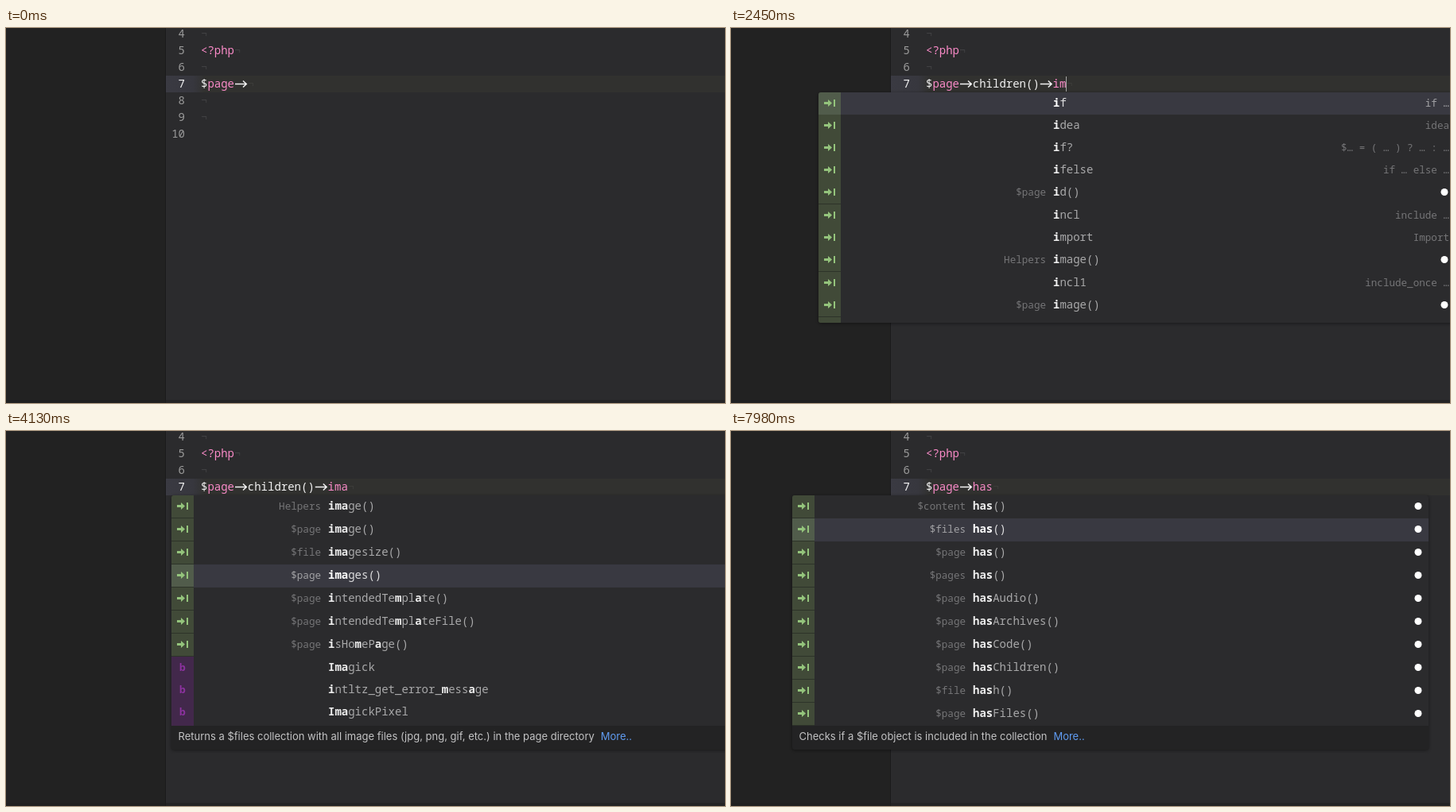
An HTML page with a canvas for the animation above (8 s loop, 904x472 px).

```html
<!DOCTYPE html>
<html lang="en">
<head>
<meta charset="utf-8">
<title>Editor autocomplete</title>
<style>
html, body { margin: 0; width: 100%; height: 100%; overflow: hidden; background: #2b2b2d; }
canvas { display: block; }
</style>
</head>
<body>
<canvas id="stage" width="904" height="472"></canvas>
<script>
const ctx = document.getElementById('stage').getContext('2d');
const LOOP = 8000, CHAR = 8.4, CODE_X = 245, LINE = 21, MENU_TOP = 81, MENU_HEIGHT = 290;
const MONO = '"Noto Sans Mono", monospace';
const PINK = '#fa8bc8', WHITE = '#f2f2f2';
const BG = '#2b2b2d';

// Typed text after "$page->" : [time, text]
const keys = [
  [-600, ''], [140, 'c'], [280, 'ch'], [420, 'chi'], [560, 'chil'], [1050, 'children()'],
  [1820, 'children()-'], [1890, 'children()->'], [2240, 'children()->i'],
  [2380, 'children()->im'], [2590, 'children()->ima'], [4620, 'children()->images()']
];
const finalText = 'children()->images()';
for (let i = 1; i <= finalText.length; i++) keys.push([6060 + i * 30, finalText.slice(0, -i)]);
keys.push([6860, 'h'], [7000, 'ha'], [7140, 'has']);

// Rows are "kind|label|name|hint": k = documented method, s = snippet, b = built-in
const rows = text => text.trim().split('\n').map(line => {
  const [kind, label, name, hint] = line.trim().split('|');
  return { kind, label, name, hint, height: kind === 'k' ? 29 : 28 };
});

const menus = {
  c: { left: 74, right: 766, x: 304, match: 'c', rows: rows(`
    s||class|class …
    s||case|case …
    s||catch|catch …
    k|$page|code()|
    k|$pages|code()|
    s||const|const …
    k|$page|content()|
    k|$page|children()|
    k|$site|children()|
    k|$pages|count()|`) },
  chil: { left: 107, right: 627, x: 304, match: 'chil', rows: rows(`
    k|$page|children()|
    k|$pages|children()|
    k|$site|children()|`) },
  i: { left: 110, right: 910, x: 405, match: 'i', rows: rows(`
    s||if|if …
    s||idea|idea
    s||if?|$… = ( … ) ? … : …
    s||ifelse|if … else …
    k|$page|id()|
    s||incl|include …
    s||import|Import
    k|Helpers|image()|
    s||incl1|include_once …
    k|$page|image()|
    k|$file|imagesize()|`) },
  im: { left: 125, right: 925, x: 405, match: 'im', rows: rows(`
    s||import|Import
    k|Helpers|image()|
    k|$page|image()|
    k|$file|imagesize()|
    k|$page|images()|
    k|$page|intendedTemplate()|
    k|$page|intendedTemplateFile()|
    k|$page|isHomePage()|
    b||Imagick|
    b||ImagickPixel|`) },
  ima: { left: 208, right: 1008, x: 405, match: 'ima', rows: rows(`
    k|Helpers|image()|
    k|$page|image()|
    k|$file|imagesize()|
    k|$page|images()|
    k|$page|intendedTemplate()|
    k|$page|intendedTemplateFile()|
    k|$page|isHomePage()|
    b||Imagick|
    b||intltz_get_error_message|
    b||ImagickPixel|`) },
  has: { left: 77, right: 877, x: 304, match: 'has', rows: rows(`
    k|$content|has()|
    k|$files|has()|
    k|$page|has()|
    k|$pages|has()|
    k|$page|hasAudio()|
    k|$page|hasArchives()|
    k|$page|hasCode()|
    k|$page|hasChildren()|
    k|$file|hash()|
    k|$page|hasFiles()|`) }
};

// [time, menu, selected row, documentation]
const menuSteps = [
  [0], [210, 'c', 0], [700, 'chil', 0, 'Returns a collection with all children of the page'],
  [1050], [2310, 'i', 0], [2590, 'im', 0],
  [2660, 'ima', 0, 'Returns the first image of the page or the image with the given filename'],
  [3220, 'ima', 1, 'Returns a specific image $file object by filename. If no filename is given, the first available image will be returned'],
  [3640, 'ima', 2, 'Returns the dimensions of the image file'],
  [3920, 'ima', 3, 'Returns a $files collection with all image files (jpg, png, gif, etc.) in the page directory'],
  [4620], [7210, 'has', 0, 'Checks if a field exists in the content'],
  [7700, 'has', 1, 'Checks if a $file object is included in the collection']
];

const latest = (list, t) => list.findLast(step => step[0] <= t);

function rect(x, y, w, h, color) {
  ctx.fillStyle = color;
  ctx.fillRect(x, y, w, h);
}

function text(str, x, y, color, { size = 14, weight = 400, family = MONO, align = 'left' } = {}) {
  ctx.font = `${weight} ${size}px ${family}`;
  ctx.textAlign = align;
  ctx.fillStyle = color;
  ctx.fillText(str, x, y);
}

function codeArrow(x, y) {
  ctx.strokeStyle = WHITE;
  ctx.lineWidth = 1.5;
  ctx.beginPath();
  ctx.moveTo(x + 1, y);
  ctx.lineTo(x + 15, y);
  ctx.moveTo(x + 11, y - 4);
  ctx.lineTo(x + 15.3, y);
  ctx.lineTo(x + 11, y + 4);
  ctx.stroke();
}

function drawEditor(menuOpen) {
  rect(0, 0, 904, 472, BG);
  rect(0, 0, 200, 472, '#222222');
  rect(200, 0, 1, 472, '#1a1a1b');
  rect(0, 468, 904, 4, 'rgba(30,30,30,.5)');

  const glow = ctx.createLinearGradient(201, 0, 250, 0);
  glow.addColorStop(0, '#3a3a42');
  glow.addColorStop(0.7, '#37373e');
  glow.addColorStop(1, '#31312f');
  rect(201, 60, 703, LINE, glow);

  for (let n = 4; n <= 10; n++) {
    const y = 12 + (n - 4) * LINE;
    text(n, 225, y, n === 7 ? WHITE : '#9b9b9b', { weight: 500, align: 'right' });
    if (n !== 5 && n !== 7 && n !== 10) text('¬', CODE_X, y, '#424244');
  }
  text('<?php', CODE_X, 33, PINK, { weight: 500 });
  text('¬', CODE_X + 5 * CHAR, 33, '#424244');
}

function drawCode(t) {
  const [since, typed] = latest(keys, t);
  const y = 75, weight = 500;
  let x = CODE_X;
  for (const [token] of ('$page->' + typed).matchAll(/->|\w+|\W/g)) {
    if (token === '->') codeArrow(x, 70.5);
    else {
      const end = Math.round((x - CODE_X) / CHAR) + token.length;
      const called = ('$page->' + typed)[end] === '(';
      text(token, x, y, /\w/.test(token) && !called ? PINK : WHITE, { weight });
    }
    x += token.length * CHAR;
  }
  text('¬', x, y, '#3d3d3b');
  if (typed.endsWith('()')) {
    for (let dot = x - 2 * CHAR; dot < x; dot += 2) rect(Math.round(dot), 80, 1, 1, '#66d9ef');
  }
  if ((t - since) % 1000 < 500) rect(Math.round(x), 61, 1, 19, '#a5a5a5');
}

function drawIcon(kind, left, mid) {
  if (kind === 'b') {
    text('b', left + 14, mid + 5, '#8d32a0', { size: 13, weight: 700, align: 'center' });
    return;
  }
  rect(left + 7, mid - 1, 6, 3, '#94c47c');
  rect(left + 19, mid - 4, 2, 9, '#94c47c');
  ctx.beginPath();
  ctx.moveTo(left + 12, mid - 4);
  ctx.lineTo(left + 17, mid + 0.5);
  ctx.lineTo(left + 12, mid + 5);
  ctx.fill();
}

// Characters matching the typed letters in order are emphasised.
function drawName(name, match, x, y, selected) {
  let matched = 0;
  [...name].forEach((ch, i) => {
    const hit = matched < match.length && ch.toLowerCase() === match[matched];
    if (hit) matched++;
    const color = hit ? (selected ? '#ffffff' : '#ececec') : (selected ? '#dededf' : '#a9a9aa');
    text(ch, x + i * CHAR, y, color, { weight: hit ? 700 : selected ? 500 : 400 });
  });
}

function drawRow(row, menu, top, selected) {
  const { left, right, x, match } = menu;
  const green = row.kind !== 'b';
  const mid = top + 13, baseline = top + 18;
  if (selected) rect(left + 28, top, right - left - 28, row.height, '#393941');
  rect(left, top, 28, row.height, green ? (selected ? '#515c4b' : '#414a38') : '#42284b');
  if (row.kind === 'k') rect(left, top + 28, 28, 1, '#2d3329');
  drawIcon(row.kind, left, mid);

  const side = { size: 12.6, align: 'right', weight: selected ? 500 : 400 };
  const sideColor = selected ? '#a2a2a5' : '#757577';
  text(row.label, x - 9, baseline, sideColor, side);
  drawName(row.name, match, x, baseline, selected);
  if (row.kind === 'k') {
    ctx.fillStyle = '#ffffff';
    ctx.beginPath();
    ctx.arc(right - 13, mid + 0.5, 4.5, 0, 2 * Math.PI);
    ctx.fill();
  } else if (row.hint) text(row.hint, right - 7, baseline, sideColor, side);
}

function drawMenu([, name, selected, doc]) {
  const menu = menus[name];
  const { left, right } = menu;
  const width = right - left;
  const total = menu.rows.reduce((sum, row) => sum + row.height, 0);
  const height = name === 'chil' ? total : MENU_HEIGHT;
  const bottom = MENU_TOP + height;

  ctx.save();
  ctx.shadowColor = 'rgba(0,0,0,.45)';
  ctx.shadowBlur = 4;
  ctx.shadowOffsetY = 1;
  ctx.fillStyle = doc ? '#232324' : BG;
  ctx.beginPath();
  ctx.roundRect(left, MENU_TOP, width, height + (doc ? 30 : 0), 3);
  ctx.fill();
  ctx.restore();

  ctx.save();
  ctx.beginPath();
  ctx.roundRect(left, MENU_TOP, width, height, doc ? [3, 3, 0, 0] : 3);
  ctx.clip();
  rect(left, MENU_TOP, width, height, BG);
  let top = MENU_TOP;
  menu.rows.forEach((row, i) => {
    drawRow(row, menu, top, i === selected);
    top += row.height;
  });
  if (menu.rows.at(-1).kind === 'b') rect(left, top, 28, bottom - top, '#42284b');
  ctx.restore();

  if (doc) {
    const font = { size: 13, family: 'Inter, sans-serif' };
    text(doc, left + 8.5, bottom + 18, '#c3c3c4', font);
    text('More..', left + 16.5 + ctx.measureText(doc).width, bottom + 18, '#609cf2', font);
  }
}

function frame(now) {
  const t = now % LOOP;
  const step = latest(menuSteps, t);
  drawEditor();
  drawCode(t);
  if (step[1]) drawMenu(step);
  requestAnimationFrame(frame);
}
requestAnimationFrame(frame);
</script>
</body>
</html>
```
